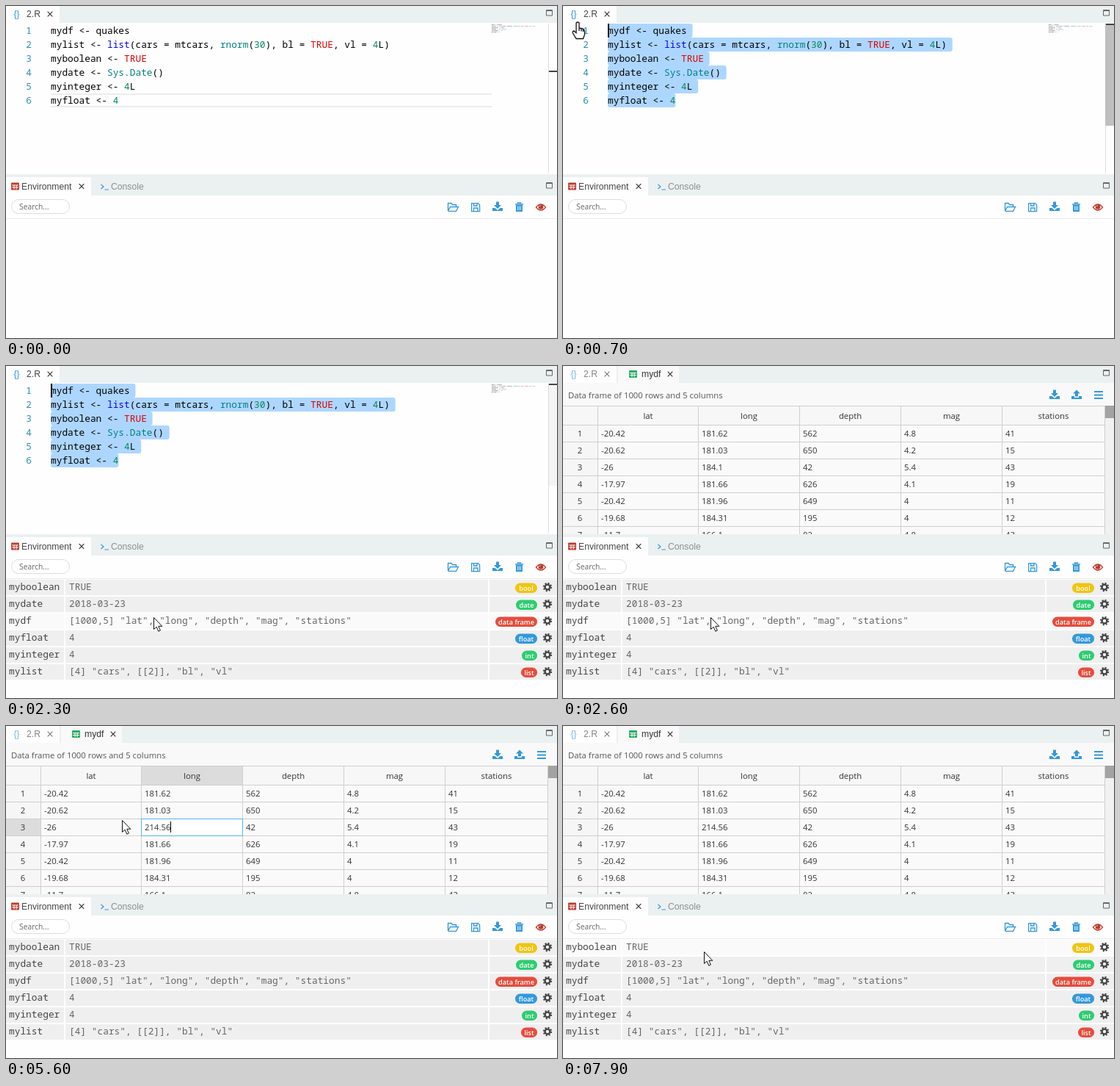
An HTML page that plays this animation: 751 by 452 pixels, repeating every 8 s.

```html
<!DOCTYPE html>
<html lang="en">
<head>
<meta charset="utf-8">
<title>Environment viewer</title>
<style>
html, body { margin: 0; width: 100%; height: 100%; overflow: hidden; background: #fefefe; }
svg { display: block; width: 751px; height: 452px; }
text { white-space: pre; }
.mono { font: 12.83px "Noto Sans Mono", monospace; }
.ui { font: 11.35px "Open Sans", sans-serif; }
.tab { font: 12.2px "Liberation Sans", sans-serif; }
.small { font: 10.3px "Open Sans", sans-serif; }
.pill { font: 600 9.2px "Open Sans", sans-serif; }
.mid { text-anchor: middle; }
.end { text-anchor: end; }
</style>
</head>
<body>
<svg id="stage" viewBox="0 0 751 452"></svg>
<script>
const LOOP = 8000, STEP = 100, CHAR = 7.7;
const BLUE = '#3498db', RED = '#c0392b', BAR = '#ebf0f0', PAGE = '#fefefe', PANEL = '#f9f9f9';

const CODE = [
  'mydf <- quakes',
  'mylist <- list(cars = mtcars, rnorm(30), bl = TRUE, vl = 4L)',
  'myboolean <- TRUE',
  'mydate <- Sys.Date()',
  'myinteger <- 4L',
  'myfloat <- 4'
];
const VARS = [
  ['myboolean', 'TRUE', 'bool', '#f1c40f', 30],
  ['mydate', '2018-03-23', 'date', '#2ecc71', 29],
  ['mydf', '[1000,5] "lat", "long", "depth", "mag", "stations"', 'data frame', '#e74c3c', 57],
  ['myfloat', '4', 'float', BLUE, 30],
  ['myinteger', '4', 'int', '#2ecc71', 21],
  ['mylist', '[4] "cars", [[2]], "bl", "vl"', 'list', '#e74c3c', 22]
];
const COLS = ['lat', 'long', 'depth', 'mag', 'stations'];
const EDGES = [47, 184, 322, 460, 598, 738];
const ROWS = [
  '-20.42 181.62 562 4.8 41', '-20.62 181.03 650 4.2 15', '-26 184.1 42 5.4 43',
  '-17.97 181.66 626 4.1 19', '-20.42 181.96 649 4 11', '-19.68 184.31 195 4 12',
  '-11.7 166.1 82 4.8 43'
];

// Cell value by time
const TYPED = [
  [0, '184.1'], [4800, '2'], [4900, '21'], [5100, '214'],
  [5300, '214.'], [5500, '214.5'], [5600, '214.56']
];
// Pointer: time, x, y, shape until the next key
const PATH = [
  [0, 718, 60, ''], [100, 718, 60, 'beam'], [200, 450, 125, 'beam'], [300, 240, 134, 'beam'],
  [400, 240, 134, 'beam'], [500, 140, 131, 'beam'], [600, 75, 80, 'beam'], [700, 20, 22, 'hand'],
  [800, 75, 70, 'beam'], [1000, 237, 128, 'beam'], [1400, 237, 128, 'beam'], [1700, 215, 170, 'beam'],
  [1900, 203, 240, 'arrow'], [2300, 201, 342, 'arrow'], [2700, 201, 342, 'arrow'],
  [3100, 235, 230, 'arrow'], [3500, 251, 136, 'arrow'], [3700, 251, 138, 'beam'],
  [3800, 251, 138, 'beam'], [3900, 233, 138, 'beam'], [4100, 190, 134, 'arrow'],
  [4300, 158, 128, 'arrow'], [6400, 158, 128, 'arrow'], [6500, 157, 129, 'arrow'],
  [6600, 157, 129, 'arrow'], [7000, 176, 300, 'arrow'], [7200, 205, 343, 'arrow'],
  [7500, 195, 315, 'arrow'], [7600, 192, 307, 'arrow'], [LOOP, 192, 307, 'arrow']
];

const esc = s => s.replace(/&/g, '&amp;').replace(/</g, '&lt;');
const rect = (x, y, w, h, fill, more = '') =>
  `<rect x="${x}" y="${y}" width="${w}" height="${h}" fill="${fill}" ${more}/>`;
const text = (x, y, s, cls, fill = '#444', more = '') =>
  `<text x="${x}" y="${y}" class="${cls}" fill="${fill}" ${more}>${esc(s)}</text>`;
const fillPath = (d, fill, x = 0, y = 0) => `<path d="${d}" fill="${fill}" transform="translate(${x} ${y})"/>`;
const line = (d, color, w = 1, x = 0, y = 0) =>
  `<path d="${d}" fill="none" stroke="${color}" stroke-width="${w}" transform="translate(${x} ${y})"/>`;
const group = (id, body, more = '') => `<g id="${id}" ${more}>${body}</g>`;

const cross = (x, y, color = '#333') => line('M-3.3-3.3L3.3 3.3M3.3-3.3L-3.3 3.3', color, 1.2, x, y);
const maximize = y => line('M736.5 0H744.5V7.5H736.5ZM736 1H745', '#666', 1, 0, y + .5);
const table = (x, y, color) => rect(x, y, 11, 10, color, 'rx="1"') +
  line('M1 3.5H10M1 6.5H10M4 3V9M7.2 3V9', '#fff', 1, x, y);
const download = (x, y) => fillPath('M-2-6.5H2V-2H5L0 3L-5-2H-2ZM-7 2H-3.5L0 5L3.5 2H7V6H-7Z', BLUE, x, y);
const upload = (x, y) => fillPath('M0-6.5L5-1.5H2V2.5H-2V-1.5H-5ZM-7 2H-3V4H3V2H7V6H-7Z', BLUE, x, y);
const gear = y => `<g fill="none" stroke="#444" transform="translate(738 ${y})">
  <circle r="5.1" stroke-width="2.2" stroke-dasharray="2 2"/><circle r="3.4" stroke-width="2.4"/></g>`;

function tokens(s) {
  const kinds = [[/^TRUE$/, '#d00'], [/^list$/, '#00f'], [/^(rnorm|Sys\.Date)$/, '#008080'], [/^\d+$/, '#09885a']];
  return s.split(/(\bTRUE\b|\blist\b|\brnorm\b|\bSys\.Date\b|\b\d+)/).map(part => {
    const kind = kinds.find(k => k[0].test(part));
    return `<tspan fill="${kind ? kind[1] : '#000'}">${esc(part)}</tspan>`;
  }).join('');
}

function editor() {
  const lines = CODE.map((s, i) => `<text x="61" y="${38 + 19 * i}" class="mono">${tokens(s)}</text>`).join('');
  const numbers = CODE.map((s, i) => text(35, 38 + 19 * i, String(i + 1), 'mono end', '#2b91af')).join('');
  const marks = CODE.map((s, i) => rect(61, 24 + 19 * i, (s.length + (i < 5)) * CHAR, 19, '#add6ff', 'rx="3" class="mark"')).join('');
  return rect(0, 0, 73, 23, PAGE) + rect(0, 23, 751, 206, PAGE) +
    group('current', line('M61 120H662M61 137H662', '#ececec', 2)) + marks + numbers + lines +
    group('caret', rect(61, 0, 2, 19, '#000')) +
    `<g transform="translate(654 22) scale(.13 .105)">${lines}</g>` +
    line('M739.5 24V228', '#ddd') + group('slider', rect(739, 24, 12, 139, '#bfbfbf')) +
    group('ruler', rect(740, 0, 11, 2, '#444'));
}

function frame() {
  const head = EDGES.slice(0, 5).map((x, i) =>
    text((x + EDGES[i + 1]) / 2 + .5, 72, COLS[i], 'ui mid', '#333')).join('');
  const cells = ROWS.map((row, r) => {
    const y = 96 + 23 * r;
    return text(23, y, String(r + 1), 'ui mid', '#333') + row.split(' ').map((v, c) =>
      text(EDGES[c] + 5, y, v, 'ui', '#333', r === 2 && c === 1 ? 'id="cell"' : '')).join('');
  }).join('');
  const rules = 'M0 54.5H739' + ROWS.map((r, i) => `M0 ${80.5 + 23 * i}H739`).join('') +
    EDGES.map(x => `M${x + .5} 54V229`).join('');
  const pick = rect(185, 55, 137, 25, '#dcdcdc') + group('pickRow', rect(0, 127, 47, 22, '#dcdcdc'));
  const box = group('box', rect(184.5, 126.5, 138, 23, '#fff', 'stroke="#5ab3e8"') +
    group('handle', rect(319.5, 146.5, 6, 6, '#4aa3df', 'stroke="#fff"')));
  const grid = rect(0, 54, 739, 175, '#fafafa') + rect(0, 54, 739, 26, '#f7f7f7') + rect(0, 80, 47, 149, '#f6f6f6') +
    group('pick', pick) + line(rules, '#cfcfcf') + group('boxWrap', box) + head + cells +
    group('editCaret', rect(0, 130, 1, 15, '#000')) +
    rect(739, 54, 12, 175, '#f1f1f1') + rect(739, 54, 12, 17, '#a3a3a3');
  const tools = text(7, 44, 'Data frame of 1000 rows and 5 columns', 'ui', '#555') +
    download(670, 39) + upload(700, 39) + line('M724 35H736M724 39.5H736M724 44H736', BLUE, 2);
  return group('activeTab', rect(75, 0, 83, 23, PANEL)) + rect(0, 23, 751, 206, PANEL) + table(90, 6, '#27ae60') +
    text(107, 15, 'mydf', 'tab', '#333', 'id="title"') + group('tabClose', cross(146, 11)) +
    group('tools', tools) + group('grid', grid);
}

function environment() {
  return VARS.map(([name, value, type, color, w], i) => {
    const y = 291 + 23 * i;
    return `<g class="row" fill="#efefef"><rect y="${y}" width="79" height="21"/>
      <rect x="81" y="${y}" width="576" height="21"/><rect x="659" y="${y}" width="92" height="21"/></g>` +
      text(4, y + 14, name, 'mono') + text(86, y + 14, value, 'mono', '#666') +
      rect(724 - w, y + 4.5, w, 13.5, color, 'rx="6.7"') +
      text(724 - w / 2, y + 14.5, type, 'pill mid', '#fff') + gear(y + 10);
  }).join('');
}

const fileTab = group('fileTab', text(10.5, 15, '{}', 'tab', BLUE, 'font-weight="bold"') +
  text(28, 15, '2.R', 'tab') + cross(60, 11));

const lower = rect(0, 229, 751, 29, BAR) + rect(0, 233, 116, 25, PAGE) + rect(0, 258, 751, 194, PAGE) +
  table(7, 240.5, RED) + text(21, 250, 'Environment', 'tab') + cross(103, 245.5) +
  line('M129.5 243L133 246L129.5 249M134.5 250H140', BLUE, 1.2) + text(143, 250, 'Console', 'tab', '#8a8f90') +
  maximize(240) + line('M0 289.5H751', '#ebebeb') +
  rect(7.5, 263.5, 79, 19, '#fff', 'rx="9.5" stroke="#ddd"') + text(18, 277, 'Search...', 'small', '#666') +
  line('M602.5 279V268.5H607L608.5 270.5H613.5V273M602.5 279L605.5 273.5H616.5L613.5 279.3H602.5', BLUE, 1.3) +
  line('M634.6 268.6H643.5L645.6 270.7V279.6H634.6ZM637.5 279V275H643V279M637.5 269V272H642V269', BLUE, 1.3) +
  download(670, 273) +
  line('M694 270H705M697.5 269V268H701.5V269', BLUE, 1.5) + fillPath('M695 271H704V280H695Z', BLUE) +
  line('M697.5 272.5V278M699.5 272.5V278M701.5 272.5V278', '#fff', .8) +
  line('M722.5 274Q729 266 735.5 274Q729 282 722.5 274Z', RED, 1.3) +
  `<circle cx="729" cy="273.5" r="3.3" fill="${RED}"/>` + line('M727.3 273Q727.5 271.7 728.8 271.6', '#fff', .8);

const shapes = {
  arrow: '<path d="M.5.5V16.5L4.2 13.2L6.8 19.2L9.4 18L6.8 12.3H11.8Z" fill="#fff" stroke="#111"/>',
  beam: line('M-3.5-7.5H-1L0-6.5L1-7.5H3.5M-3.5 7.5H-1L0 6.5L1 7.5H3.5M0-6.5V6.5', '#111', 1.4),
  hand: '<path d="M-2 1Q0-1 2 1V8L7 9Q9.5 10 9.5 13V17L7.5 22.5H-2L-6.5 15Q-7.5 12-5 12L-2 14.5ZM2 8V12M5 9V12.5M7.5 10V13" fill="#fff" stroke="#111" stroke-width="1.3"/>'
};

document.getElementById('stage').innerHTML =
  rect(0, 0, 751, 229, BAR) + group('editor', editor()) + group('frame', frame()) +
  fileTab + maximize(5) + lower + group('env', environment()) +
  group('pointer', Object.keys(shapes).map(k => group(k, shapes[k])).join(''));

const $ = id => document.getElementById(id);
const show = (id, on) => $(id).setAttribute('display', on ? 'inline' : 'none');
const move = (id, x, y) => $(id).setAttribute('transform', `translate(${x} ${y})`);
const within = (t, a, b) => t >= a && t < b;
const marks = [...document.querySelectorAll('.mark')];
const rows = [...document.querySelectorAll('.row')];

function pointerAt(t) {
  const i = PATH.findIndex((p, k) => k === PATH.length - 1 || t < PATH[k + 1][0]);
  const a = PATH[i], b = PATH[i + 1] || a;
  const u = (t - a[0]) / (b[0] - a[0] || 1);
  return { x: a[1] + (b[1] - a[1]) * u, y: a[2] + (b[2] - a[2]) * u, kind: a[3] };
}

function draw(t) {
  // Editor: backwards drag selection and fading scrollbar
  const from = t < 500 ? 6 : t < 600 ? 5 : t < 700 ? 2 : 0;
  marks.forEach((m, i) => m.setAttribute('display', i >= from ? 'inline' : 'none'));
  show('current', t < 500);
  show('caret', t >= 500);
  move('caret', 0, 24 + 19 * Math.min(from, 5));
  move('ruler', 0, t < 500 ? 88 : 24 + 13 * from);
  $('slider').setAttribute('opacity', t < 100 ? 0 : Math.max(.15, Math.min(1, 1 - (t - 1800) / 500)));

  // Data frame tab
  show('frame', t >= 2400);
  show('tools', t >= 2500);
  show('grid', t >= 2600);
  $('fileTab').setAttribute('opacity', t < 2400 ? 1 : .65);
  const dirty = within(t, 6000, 6500);
  $('title').textContent = dirty ? 'mydf*' : 'mydf';
  move('tabClose', dirty ? 5 : 0, 0);

  // Cell selection and editing
  const picked = within(t, 3400, 7900), editing = within(t, 3600, 6000);
  const down = t >= 6000 ? 23 : 0;
  show('pick', picked);
  show('boxWrap', picked);
  show('handle', !editing);
  move('pickRow', 0, down);
  move('box', 0, down);
  $('cell').textContent = TYPED.filter(k => k[0] <= t).pop()[1];
  show('editCaret', editing);
  if (editing) move('editCaret', Math.round(189 + $('cell').getComputedTextLength()), 0);

  // Pointer and row hover
  const p = pointerAt(t);
  move('pointer', Math.round(p.x), Math.round(p.y));
  Object.keys(shapes).forEach(k => show(k, k === p.kind));
  show('env', t >= 1200);
  const hover = Math.floor((p.y - 290) / 23);
  rows.forEach((r, i) => r.setAttribute('fill', i === hover ? '#fafafa' : '#efefef'));
}

const start = performance.now();
function tick() {
  const t = (performance.now() - start) % LOOP;
  draw(Math.floor(t / STEP) * STEP);
  requestAnimationFrame(tick);
}
tick();
</script>
</body>
</html>
```
